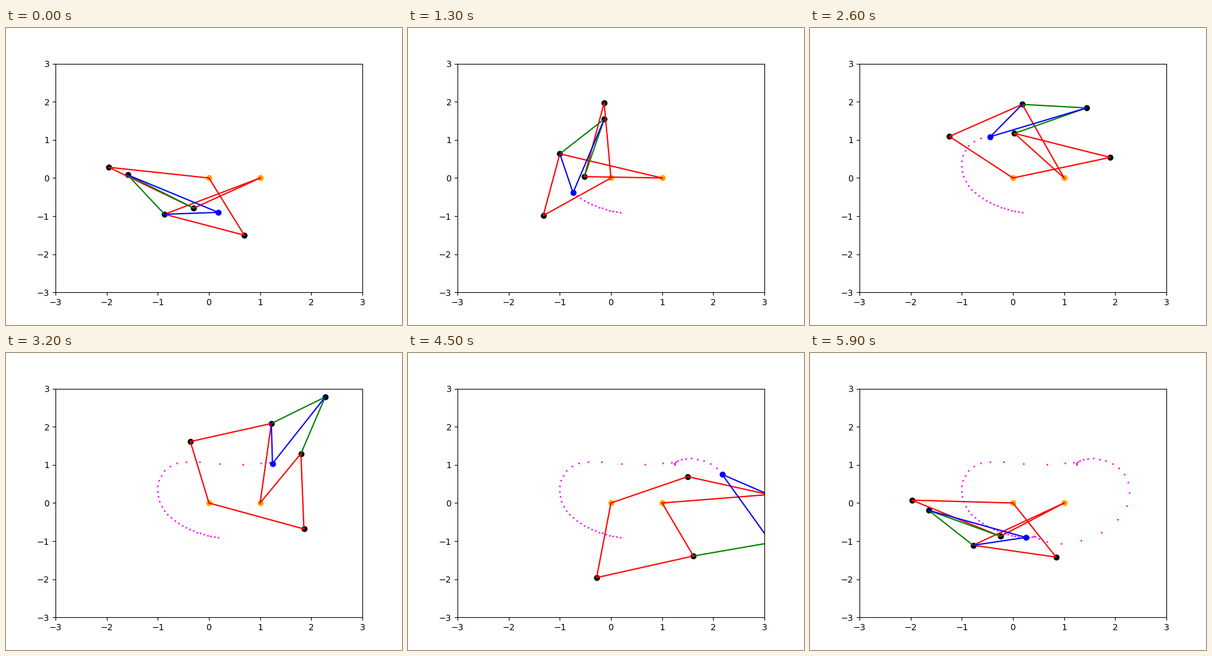
A matplotlib script for the animation above (6 s loop, 640 by 480 pixels).

```python
import numpy as np
import matplotlib.pyplot as plt
from matplotlib.animation import FuncAnimation

FRAMES = 60
ORIGIN = np.array([0.0, 0.0])
PIVOT = np.array([1.0, 0.0])

# Crank lengths and start angles
CRANK_A, CRANK_B = 1.978, 1.652
START_A, START_B = np.radians([171.85, -65.28])


def polar(length, angle):
    return length * np.array([np.cos(angle), np.sin(angle)])


def join(p, q, rp, rq, side):
    """Point at distance rp from p and rq from q; side 1 is left of p->q."""
    d = q - p
    dist = np.hypot(*d)
    u = d / dist
    along = (rp**2 - rq**2 + dist**2) / (2 * dist)
    off = np.sqrt(max(rp**2 - along**2, 0))
    return p + along * u + side * off * np.array([-u[1], u[0]])


def pose(i):
    turn = -2 * np.pi * i / FRAMES
    a = polar(CRANK_A, START_A + turn)
    b = polar(CRANK_B, START_B + turn)
    p = join(a, PIVOT, 1.976, 1.520, -1)
    q = join(b, PIVOT, 1.653, 2.097, 1)
    r = join(q, p, 1.260, 1.559, 1)
    s = join(q, r, 1.0525, 2.027, -1)
    return a, b, p, q, r, s


poses = [pose(i) for i in range(FRAMES)]
path = np.array([ps[-1] for ps in poses])

fig, ax = plt.subplots(figsize=(6.4, 4.8), dpi=100)
ax.set_xlim(-3, 3)
ax.set_ylim(-3, 3)

trace = ax.scatter([], [], s=1, color="magenta")
ax.scatter(*zip(ORIGIN, PIVOT), color="orange")
joints = ax.scatter([], [], color="black")
foot = ax.scatter([], [], color="blue")
bars = [ax.plot([], [], color=c)[0] for c in ("red", "red", "green", "blue")]


def update(i):
    a, b, p, q, r, s = poses[i]
    chains = ([ORIGIN, a, p, PIVOT], [ORIGIN, b, q, PIVOT], [q, r, p], [q, s, r])
    for bar, chain in zip(bars, chains):
        bar.set_data(*zip(*chain))
    joints.set_offsets([a, b, p, q, r])
    foot.set_offsets([s])
    trace.set_offsets(path[:i + 1])
    return [trace, joints, foot, *bars]


anim = FuncAnimation(fig, update, frames=FRAMES, interval=100, repeat=True)
plt.show()
```
